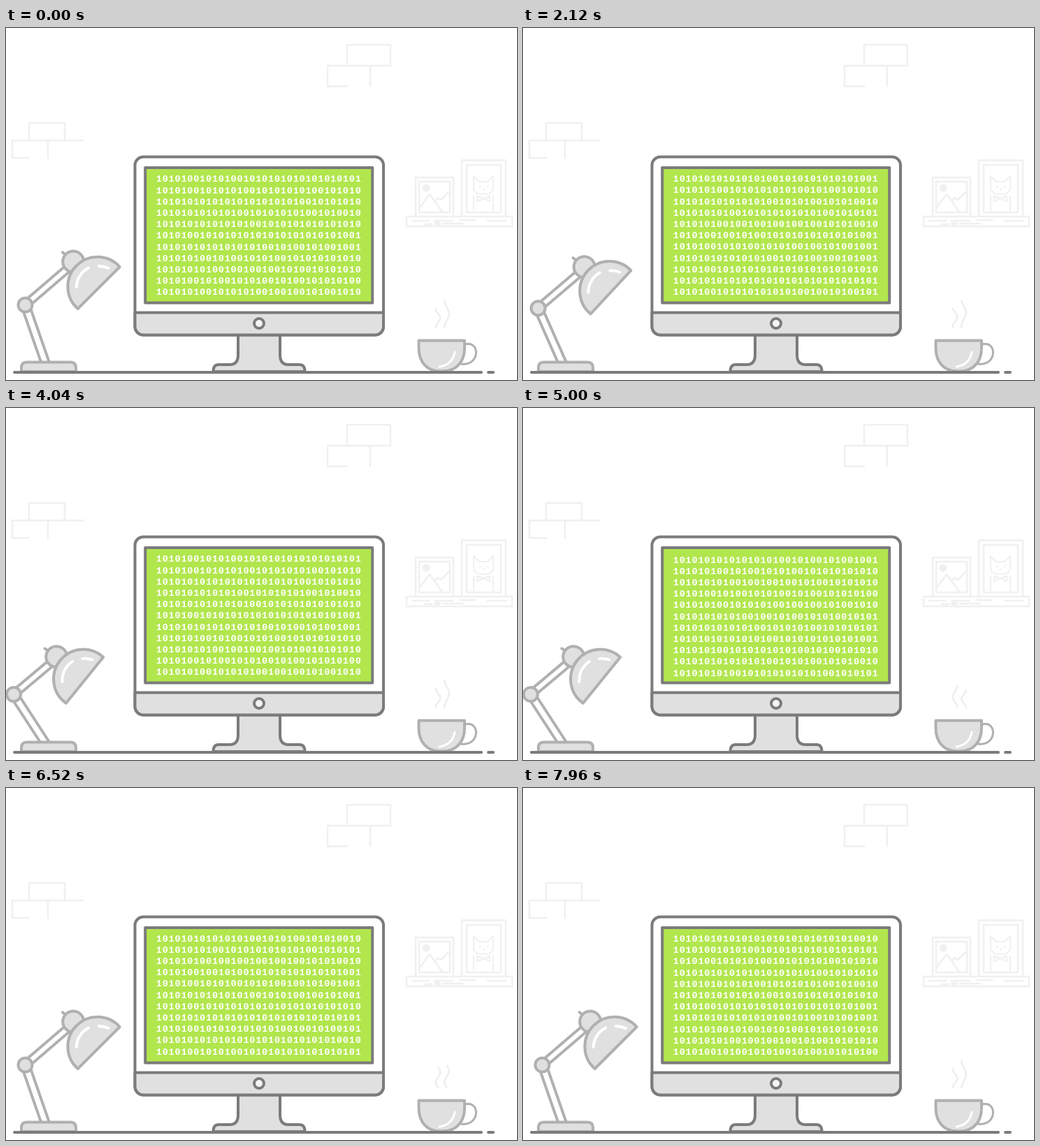
An HTML page for the animation above (8 s loop, 731 px wide and 504 px high).

```html
<!DOCTYPE html>
<html lang="en">
<head>
<meta charset="utf-8">
<title>Desk</title>
<style>
html, body { margin: 0; width: 100%; height: 100%; overflow: hidden; background: #fff; }
svg { display: block; width: 731px; height: 504px; fill: none; stroke-linecap: round; stroke-linejoin: round; }
.wall { stroke: #f0f0f0; stroke-width: 2.5; }
.soft { stroke: #b0b0b0; stroke-width: 4; }
.dark { stroke: #7b7b7b; stroke-width: 4; }
.grey { fill: #e0e0e0; }
.shine { stroke: #fff; }
.thin { stroke-width: 3; }
text { font: bold 13.5px "Liberation Mono", monospace; letter-spacing: .8px; fill: #fff; }
</style>
</head>
<body>
<svg viewBox="0 0 731 504">
  <defs><clipPath id="screen"><path d="M202 205H522V389H202Z"/></clipPath></defs>

  <g class="wall" stroke-linecap="butt">
    <path d="M488 24H550V54H488ZM489 83.5H460V54H521V84"/>
    <path d="M33 161V136H84V161M111 161H9V186H34M60 161V187"/>
    <path d="M573 270H724V284H573ZM580 276H606M612 276H640M648 275H672M688 276H716M598 281H610M624 280H655"/>
    <path d="M586 270V214H640V270M591 220H635V264H591Z"/>
    <path d="M592 257L606 238L624 263M613 248L618 243L622 246L634 234"/>
    <path d="M652 270V189.5H715V270M659 196H708V264H659Z"/>
    <g stroke-width="2">
      <path d="M669 212L677 220H689L697 212V231Q695 238 683 238Q671 238 669 231ZM669 240V262M697 240V262"/>
      <path d="M683 244L674 240.500V248ZM683 244L692 240.500V248Z"/>
    </g>
    <g fill="#f0f0f0" stroke="none">
      <circle cx="601" cy="229" r="5.5"/><circle cx="678" cy="227" r="1.5"/><circle cx="689" cy="227" r="1.5"/>
      <circle cx="683" cy="231" r="1.5"/><ellipse cx="617" cy="280" rx="5" ry="3"/>
    </g>
  </g>

  <g class="soft">
    <path id="lower" fill="#fff"/>
    <path id="upper" fill="#fff"/>
    <circle id="elbow" class="grey" r="10"/>
    <path class="grey" d="M22 492V486Q22 478.500 30 478.500H92Q100 478.500 100 486V492Z"/>
    <g id="head">
      <path d="M-52 -51L-46 -46"/>
      <circle class="grey" cx="-36.5" cy="-37.5" r="15"/>
      <path class="grey" d="M30 -30A42.500 42.500 0 1 0 -30 30Z"/>
      <path class="shine" d="M-32 -1A32 32 0 0 1 -14.500 -28.500M0 -31A32 32 0 0 1 14 -28"/>
    </g>
  </g>

  <g class="dark">
    <path class="grey" d="M332 440V468Q332 482 320 482H304Q296.500 482 296.500 492H427.500Q427.500 482 420 482H404Q392 482 392 468V440"/>
    <rect x="184.5" y="184.5" width="355.5" height="255" rx="12" fill="#fff"/>
    <path class="grey" d="M184.500 407.500H540V427.500A12 12 0 0 1 528 439.500H196.500A12 12 0 0 1 184.500 427.500Z"/>
    <rect x="199.2" y="200" width="325" height="193.5" fill="#b1e64d"/>
    <circle cx="362" cy="423" r="7" fill="#f4f4f4"/>
  </g>
  <g id="code" clip-path="url(#screen)"></g>

  <g class="soft">
    <path class="thin" d="M657 453C678 447 679 484 651 481"/>
    <path class="grey" d="M590.500 447.500H656V458C656 479 643 491.500 625 491.500H621C603 491.500 590.500 479 590.500 458Z"/>
    <path class="shine thin" d="M642 464Q639 482 620 485"/>
  </g>
  <path id="steam" stroke="#eee" stroke-width="2.5"/>
  <path class="dark" d="M12 493H680M690 493H697"/>
</svg>
<script>
const LOOP = 8000, STEAM_TIME = 2000;
const ROW_TIME = 160, ROW_HEIGHT = 16.2, ROW_COUNT = 25, ROW_LENGTH = 33, VISIBLE = 11;

const $ = id => document.getElementById(id);
const mix = (a, b, k) => a + (b - a) * k;
const ramp = (t, from, to) => {
  const k = Math.min(1, Math.max(0, (t - from) / (to - from)));
  return k * k * (3 - 2 * k);
};

let seed = 7;
const random = () => (seed = seed * 16807 % 2147483647) / 2147483647;

// Alternating bits with an occasional doubled zero.
function makeLine() {
  let bits = "101010";
  while (bits.length < ROW_LENGTH) bits += random() < .27 ? "010" : "10";
  return bits.slice(0, ROW_LENGTH);
}
const lines = Array.from({ length: ROW_COUNT }, makeLine);

const rows = Array.from({ length: VISIBLE + 2 }, () => {
  const row = document.createElementNS("http://www.w3.org/2000/svg", "text");
  row.setAttribute("x", 214.8);
  return $("code").appendChild(row);
});

function drawCode(t) {
  const first = Math.floor(t / ROW_TIME) % ROW_COUNT;
  const drift = 1.3 * Math.sin(2 * Math.PI * first / ROW_COUNT);
  rows.forEach((row, i) => {
    row.textContent = lines[(first + i - 1 + ROW_COUNT) % ROW_COUNT];
    row.setAttribute("y", 220.4 + (i - 1) * ROW_HEIGHT + drift);
  });
}

// A wave that travels along a short upright stroke.
function wisp(x, top, bottom, phase) {
  const steps = 12;
  const points = Array.from({ length: steps + 1 }, (_, i) => {
    const u = i / steps;
    return [x + 3.3 * Math.cos(phase + 2 * Math.PI * (u - .5)), mix(top, bottom, u)];
  });
  return "M" + points.join("L");
}

function drawSteam(t) {
  const phase = 2 * Math.PI * t / STEAM_TIME, sway = Math.cos(phase);
  $("steam").setAttribute("d",
    wisp(618, 400 + 2 * sway, 429, phase) + wisp(630.5, 397 - 7 * sway, 429, phase));
}

function arm(x1, y1, x2, y2, half) {
  const scale = half / Math.hypot(x2 - x1, y2 - y1);
  const nx = (y1 - y2) * scale, ny = (x2 - x1) * scale;
  return `M${x1 + nx} ${y1 + ny}L${x2 + nx} ${y2 + ny}L${x2 - nx} ${y2 - ny}L${x1 - nx} ${y1 - ny}`;
}

function drawLamp(t) {
  const k = ramp(t, 1800, 2600) - ramp(t, 5960, 6520);
  const ex = mix(27.5, 11, k), ey = mix(396.5, 410, k);
  const hx = mix(132.7, 112.5, k), hy = mix(372, 389.7, k);
  $("lower").setAttribute("d", arm(ex, ey, 56.5, 480, 5.5));
  $("upper").setAttribute("d", arm(ex, ey, hx - 44, hy - 28, 5));
  $("elbow").setAttribute("transform", `translate(${ex} ${ey})`);
  $("head").setAttribute("transform", `translate(${hx} ${hy}) rotate(${-6 * k})`);
}

function draw(now) {
  const t = now % LOOP;
  drawCode(t);
  drawSteam(t);
  drawLamp(t);
}

const start = performance.now();
function tick() {
  draw(performance.now() - start);
  requestAnimationFrame(tick);
}
draw(0);
requestAnimationFrame(tick);
</script>
</body>
</html>
```
